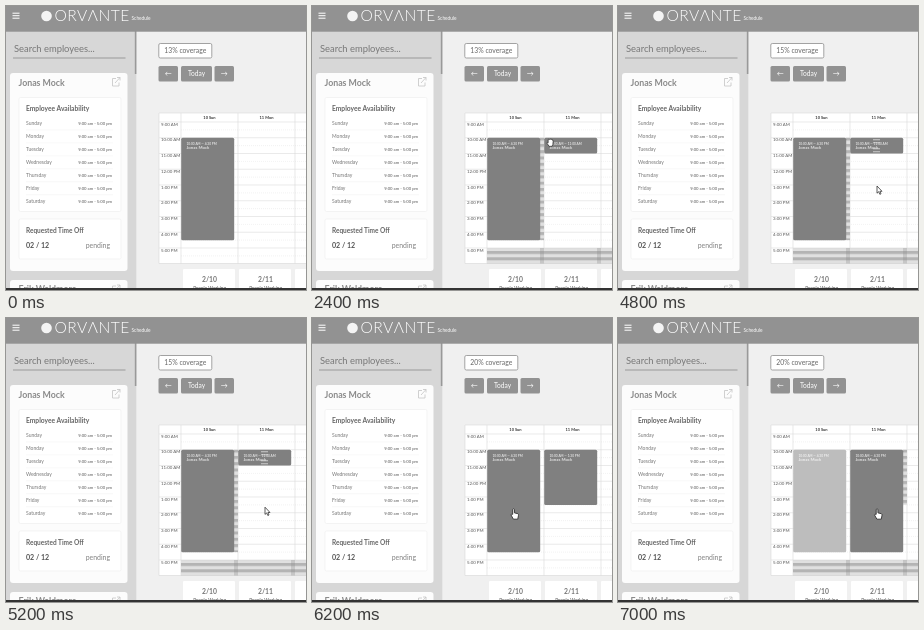
Recreate the animation shown at these times as an HTML page. Size 300x284 px, loop 7.1 s.

```html
<!DOCTYPE html>
<html lang="en">
<head>
<meta charset="utf-8">
<title>Schedule</title>
<style>
html, body { margin: 0; width: 100%; height: 100%; overflow: hidden; background: #f0f0f0; }
svg { display: block; width: 300px; height: 284px; font-family: Lato, "Open Sans", sans-serif; }
</style>
</head>
<body>
<svg id="stage" viewBox="0 0 300 284">
  <defs>
    <pattern id="hatch" y="5.6" width="4" height="6.3" patternUnits="userSpaceOnUse">
      <rect width="4" height="6.3" fill="#e0e0e0"/>
      <rect width="4" height="3" fill="#b4b4b4"/>
    </pattern>
    <g id="arrow">
      <path d="M0 0V7.2L1.7 5.7L2.8 8.3L4 7.8L2.9 5.3H5Z" fill="#fff" stroke="#333" stroke-width=".8"/>
    </g>
    <g id="hand" transform="scale(1.15)">
      <path d="M-2-4Q-1.2-5-.5-4V-1L2.4-.3Q3.3 0 3 1.5L2.4 4.5H-1.4L-3.5.8Q-3.3-.3-2 .3Z" fill="#fff" stroke="#333" stroke-width=".8"/>
    </g>
    <g id="grab">
      <path d="M-2.2.5V-2.7Q-1.5-3.5-.9-2.8Q-.2-4 .5-2.9Q1.3-3.6 1.8-2.3Q2.8-2.6 2.9-1.3L2.5 2.4L1.6 4H-1.2L-3.6.6Q-3.2-.5-2.2.5Z" fill="#fff" stroke="#333" stroke-width=".8"/>
    </g>
  </defs>
  <g id="page"></g>
  <g id="live"></g>
  <rect y="282" width="300" height="2" fill="#333"/>
</svg>
<script>
const LOOP = 7100, PERSON = 'Jonas Mock';
const TOP = 116, HOUR = 15.75;
const SUN = 175, MON = 232;
const $ = id => document.getElementById(id);
const yAt = hour => TOP + (hour - 9) * HOUR;

const rect = (x, y, w, h, fill, extra = '') =>
  `<rect x="${x}" y="${y}" width="${w}" height="${h}" fill="${fill}" ${extra}/>`;
const text = (x, y, size, str, fill = '#555', extra = '') =>
  `<text x="${x}" y="${y}" font-size="${size}" fill="${fill}" ${extra}>${str}</text>`;
const line = (x1, y1, x2, y2, stroke, extra = 'stroke-width=".6"') =>
  `<path d="M${x1} ${y1}L${x2} ${y2}" stroke="${stroke}" ${extra}/>`;
const BOLD = 'font-weight="700"', MID = 'text-anchor="middle"', END = 'text-anchor="end"';

function openIcon(y) {
  return `<path d="M110 ${y + 1}H106.5V${y + 8.5}H113V${y + 5}M109 ${y + 5.5}L114 ${y}M111 ${y}H114V${y + 3}" fill="none" stroke="#c4c4c4" stroke-width=".8"/>`;
}

function card() {
  const frame = 'rx="1.5" stroke="#f0f0f0" stroke-width=".7"';
  let s = rect(4, 67, 117.5, 198, '#fcfcfc', 'rx="3"') +
    text(12.5, 79.5, 8.8, PERSON, '#8a8a8a', BOLD) + openIcon(71.5) +
    rect(13, 91.5, 102, 114, '#fff', frame) + rect(13, 213, 102, 40, '#fff', frame) +
    text(20, 104.5, 6.7, 'Employee Availability', '#666', BOLD);
  ['Sunday', 'Monday', 'Tuesday', 'Wednesday', 'Thursday', 'Friday', 'Saturday'].forEach((day, i) => {
    const y = 119 + i * 12.95;
    s += text(20, y, 5, day, '#777') + text(106, y, 4.2, '9:00 am - 5:00 pm', '#555', END);
    if (i) s += line(20, y - 8, 107, y - 8, '#f4f4f4');
  });
  return s + text(20, 226.5, 6.5, 'Requested Time Off', '#666', BOLD) +
    text(20, 242.3, 7.1, '02 / 12', '#555', BOLD) + text(104, 242.3, 6.9, 'pending', '#808080', END);
}

function sidebar() {
  return rect(0, 25, 130.3, 259, '#d7d7d7') + rect(128.8, 25, 1.6, 43, '#999') +
    text(8, 46.3, 9.4, 'Search employees...', '#777') + rect(7, 51.5, 112.5, 1, '#999') +
    card() + rect(4, 274, 117.5, 16, '#fcfcfc', 'rx="3"') +
    text(12.5, 286.3, 8.8, 'Erik Waldmore', '#8a8a8a', BOLD) + openIcon(279);
}

function header() {
  let s = rect(0, 0, 300, 25.7, '#929292');
  for (const y of [7.2, 9.7, 12.2]) s += line(6.5, y, 13.5, y, '#fff', 'stroke-width="1"');
  return s + '<circle cx="40.5" cy="10" r="5.3" fill="#f4f4f4"/>' +
    text(48.5, 15.3, 15.6, 'ORVΛNTE', '#fff', 'font-weight="300" letter-spacing=".5"') +
    text(125.5, 13.6, 4.8, 'Schedule', '#fff');
}

function toolbar() {
  let s = rect(152.8, 37.5, 53, 14.5, '#fff', 'rx="1.5" stroke="#999" stroke-width=".9"');
  for (const [x, w, label, size] of [[152.5, 19.5, '←', 7], [175, 31, 'Today', 6.6], [208.5, 19.5, '→', 7]])
    s += rect(x, 60, w, 15.5, '#929292', 'rx="1.5"') + text(x + w / 2, 70.2, size, label, '#fff', MID);
  return s;
}

function calendar() {
  let s = rect(153, 107, 147, 150.5, '#fff');
  for (let h = 9; h <= 17; h++) {
    const y = yAt(h), label = `${(h + 11) % 12 + 1}:00 ${h < 12 ? 'AM' : 'PM'}`;
    s += line(153, y, 300, y, '#dcdcdc') +
      line(SUN, y + HOUR / 2, 300, y + HOUR / 2, '#e4e4e4', 'stroke-width=".5" stroke-dasharray="1 1"') +
      text(155, y + 3.7, 4.4, label);
  }
  for (const x of [153, SUN, MON, 289]) s += line(x, 107, x, 257.5, '#d8d8d8');
  s += line(153, 107, 300, 107, '#d8d8d8') + line(153, 257.5, 300, 257.5, '#d8d8d8') +
    text(203.5, 112.8, 4, '10 Sun', '#333', BOLD + MID) + text(260.5, 112.8, 4, '11 Mon', '#333', BOLD + MID);
  for (const [x, date] of [[177, '2/10'], [233, '2/11'], [289, '']])
    s += rect(x, 263, 52, 25, '#fff', 'rx="1"') +
      text(x + 26.5, 275.5, 6.8, date, '#777', BOLD + MID) +
      (date && text(x + 26.5, 284, 4.7, 'People Working', '#555', MID));
  return s;
}

function shift(x, end, label, fill = '#808080') {
  const y = yAt(10);
  return rect(x + .2, y, 53, yAt(end) - y, fill, 'rx="1.5"') +
    text(x + 5.5, y + 7.2, 3.2, `10:00 AM — ${label}`, '#fff') + text(x + 5.5, y + 11.4, 4.4, PERSON, '#fff');
}

const hatch = (x, y1, w, y2, extra) => rect(x, y1, w, y2 - y1, 'url(#hatch)', extra);

// Pointer path: time, x, y
const PATH = [
  [300, 200, 222], [400, 140, 175], [500, 89, 134], [700, 89, 134], [800, 74, 142], [900, 82, 130], [1000, 91, 121],
  [1500, 91, 121], [1600, 94, 124], [1900, 150, 128], [2200, 222, 134], [2300, 228, 135],
  [2600, 259, 139], [3000, 259, 139], [3400, 266, 157], [3800, 262, 149], [4000, 258, 145],
  [4400, 258, 145], [4800, 259, 180], [5100, 259, 189], [5600, 259, 190], [6000, 203, 196],
  [6200, 203, 196], [6500, 242, 195], [6900, 259, 195], [7000, 260.5, 196], [7100, 260.5, 196]
];

function pointer(t) {
  const i = PATH.findIndex(p => p[0] > t);
  const [a, b] = [PATH[i - 1], PATH[i]], k = (t - a[0]) / (b[0] - a[0]);
  return [a[1] + (b[1] - a[1]) * k, a[2] + (b[2] - a[2]) * k];
}

function live(t) {
  const during = (a, b) => t >= a && t < b;
  const adding = during(1600, 2800), resizing = during(4500, 5500), moving = t >= 6300;
  const grown = t >= 5800, over = t >= 6600;
  const monEnd = grown ? 13.5 : 11, monLabel = grown ? '1:30 PM' : '11:00 AM';
  const [x, y] = t < 300 ? [0, 0] : pointer(t);
  let s = text(179.3, 46.9, 6.8, `${t < 3100 ? 13 : grown ? 20 : 15}% coverage`, '#666', MID);

  if (adding || resizing || moving) {
    s += hatch(SUN, yAt(17), 125, 257.5);
    for (const gap of [228, 285]) s += rect(gap, yAt(17), 4, 257.5 - yAt(17), '#888', 'opacity=".3"');
    s += moving ? hatch(285, yAt(10), 4, yAt(monEnd)) : hatch(228, yAt(10), 4, yAt(16.5));
  }
  s += shift(SUN, 16.5, '4:30 PM', over ? '#bdbdbd' : '#808080');
  if (over) s += shift(MON, 16.5, '4:30 PM');
  else if (t >= 3100) s += shift(MON, monEnd, monLabel);
  if (moving && !over) s += hatch(MON + .2, yAt(10), 53, yAt(monEnd), 'opacity=".3"');
  if (resizing)
    for (const dy of [2, 5, 11, 14]) s += line(255, yAt(10) + dy, 262, yAt(10) + dy, '#ddd', 'stroke-width=".8"');

  // The dragged card gives way to a calendar preview
  if (adding && x < SUN) s += `<g transform="translate(${x - 91} ${y - 121})" opacity=".5">${card()}</g>`;
  else if (adding && x >= MON) s += shift(MON, 11, '11:00 AM');

  if (t >= 300) {
    const shape = during(900, 2800) ? 'grab' : t >= 6000 ? 'hand' : 'arrow';
    s += `<use href="#${shape}" x="${x}" y="${y}"/>`;
  }
  return s;
}

// A scaled symbol scales inside its own <use> offset, so the pointer stays on its path
$('page').innerHTML = sidebar() + header() + toolbar() + calendar();
const start = performance.now();
let shown = -1;
function tick() {
  const t = Math.floor((performance.now() - start) % LOOP / 100) * 100;
  if (t !== shown) $('live').innerHTML = live(shown = t);
  requestAnimationFrame(tick);
}
tick();
</script>
</body>
</html>
```
